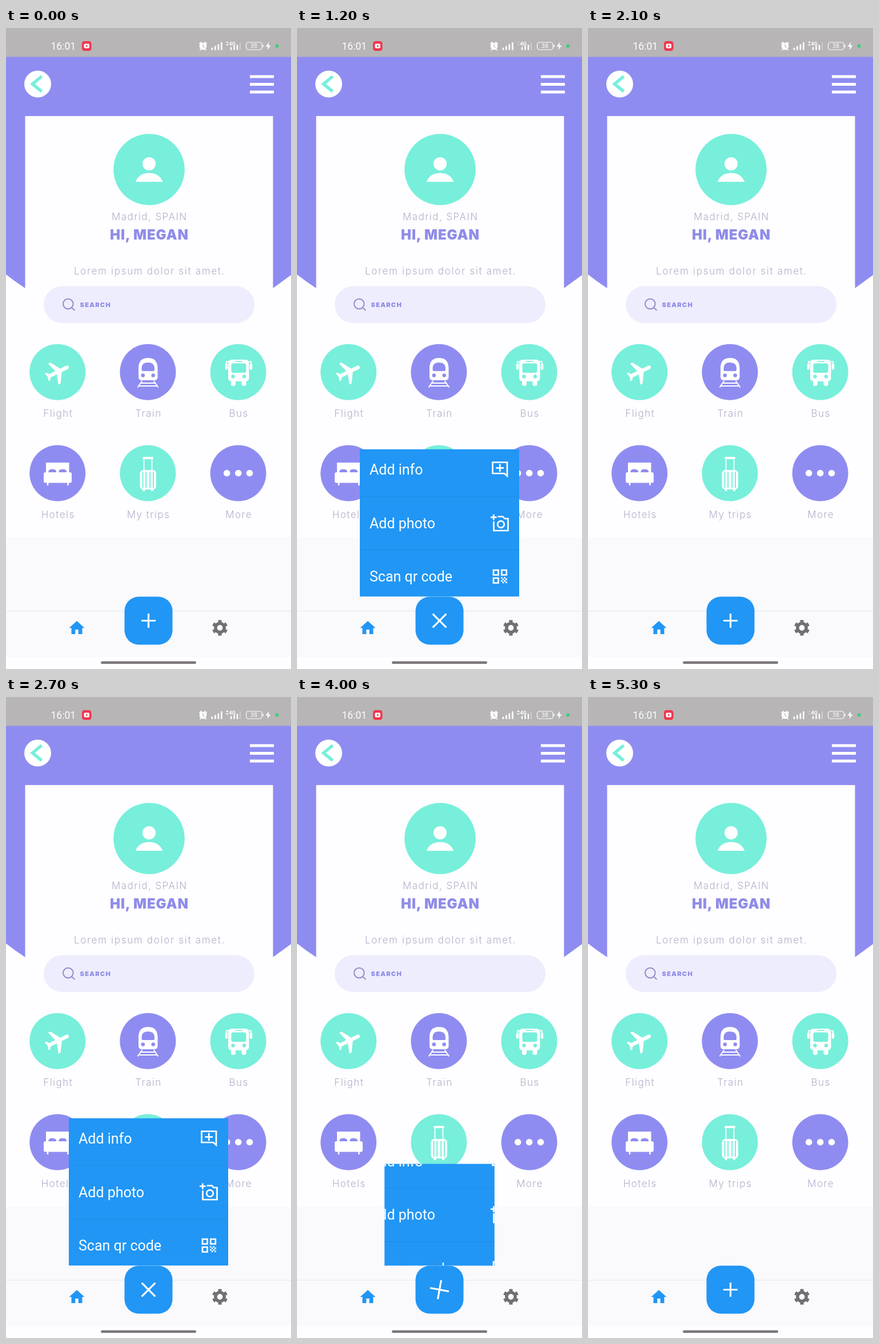
An HTML page for the animation above (5.4 s loop, 499 by 1121 pixels).

```html
<!DOCTYPE html>
<html lang="en">
<head>
<meta charset="utf-8">
<title>Travel home with pop-up menu</title>
<style>
  html, body { margin: 0; height: 100%; overflow: hidden; background: #fefdff; }
  svg { display: block; width: 100vw; height: 100vh; }
  .purple { fill: #8f8cf1; }
  .mint { fill: #77efdb; }
  .white { fill: #fff; }
  .blue { fill: #2196f5; }
  .line { fill: none; stroke: #fff; }
  .label { font: 300 17px Inter, sans-serif; letter-spacing: 1.45px; fill: #b3afca; text-anchor: middle; }
  .bold { font: 900 24px Inter, sans-serif; letter-spacing: .9px; fill: #8f8ce8; }
  .status { font-family: Roboto, sans-serif; fill: #fff; }
  #menu text { font: 25px Roboto, sans-serif; fill: #fff; }
</style>
</head>
<body>
<svg viewBox="0 0 499 1121">
  <defs><clipPath id="clip"><rect id="window"/></clipPath></defs>

  <!-- header -->
  <path class="purple" d="M0 50H499V432L467.5 455V154H33.500V455Q15 443 0 431Z"/>
  <rect width="499" height="50.500" fill="#b7b5b6"/>
  <circle class="white" cx="55.500" cy="98" r="23.500"/>
  <path d="M62.500 84.500L46.500 98L62.500 111" fill="none" stroke="#77efdb" stroke-width="5.500"/>
  <path class="line" stroke-width="4.800" d="M427 85H469M427 98.500H469M427 112H469"/>

  <!-- status bar -->
  <g class="status">
    <text x="78.500" y="38" font-size="17.500">16:01</text>
    <rect x="133" y="23" width="16.500" height="17" rx="4.500" fill="#f0364f"/>
    <rect class="white" x="136.500" y="27.500" width="9.500" height="8" rx="2"/>
    <path d="M140 29.500l3.500 2-3.500 2z" fill="#f0364f"/>
    <circle cx="345" cy="32" r="6.300"/>
    <path class="line" stroke-width="2" d="M338.500 28l4-3.500M351.500 28l-4-3.500M341 37l-1.500 2M349 37l1.500 2"/>
    <path d="M345 28.500V32.500L347.500 34" fill="none" stroke="#b7b5b6" stroke-width="1.300"/>
    <path class="line" stroke-width="2.700" d="M360.900 38.500v-4M366.400 38.500v-7M371.900 38.500v-10M377.400 38.500v-13.500"/>
    <path class="line" stroke-width="2.500" d="M394 38.500v-5M399.500 38.500v-7M405 38.500v-9"/>
    <path class="line" stroke-width="1.500" opacity=".45" d="M410 38.500v-13"/>
    <text x="390.500" y="30.500" font-size="9" font-weight="700">4G</text>
    <path id="arrows" d="M385 26l2.500-3 2.500 3zM385 28.500l2.500 3 2.500-3z"/>
    <rect class="line" x="420.600" y="25" width="27.500" height="13" rx="4" stroke-width="1.200"/>
    <path class="line" stroke-width="1.500" d="M450 29.500v4"/>
    <text x="428" y="35.300" font-size="10.500">38</text>
    <path d="M460.500 24.500l-6 8h4l-1 6 6-8h-4z"/>
    <circle cx="474.500" cy="31.500" r="3" fill="#3ccd7b"/>
  </g>

  <!-- profile -->
  <circle class="mint" cx="250.500" cy="247.500" r="62.300"/>
  <circle class="white" cx="250.500" cy="237.500" r="11.500"/>
  <path class="white" d="M226.500 269Q233 253.500 250.500 253.500T274.500 269Z"/>
  <text class="label" x="251.300" y="335.500">Madrid, SPAIN</text>
  <text class="bold" x="251" y="370" text-anchor="middle">HI, MEGAN</text>
  <text class="label" x="251.500" y="431" style="letter-spacing:1.7px">Lorem ipsum dolor sit amet.</text>
  <rect x="66" y="451.500" width="369" height="64.500" rx="32.200" fill="#eeedfd"/>
  <g fill="none" stroke="#918dcb" stroke-width="2"><circle cx="108.800" cy="482.500" r="8.800"/><path d="M115 489l5.500 5"/></g>
  <text class="bold" x="129.500" y="487.500" style="font-size:11px;letter-spacing:1.3px">SEARCH</text>

  <g id="tiles"></g>

  <!-- flight -->
  <path class="white" transform="translate(90.500 601.500) rotate(64) scale(2.150) translate(-11.500 -12)"
    d="M21 16v-2l-8-5V3.500C13 2.670 12.330 2 11.500 2S10 2.670 10 3.500V9l-8 5v2l8-2.500V19l-2 1.500V22l3.500-1 3.500 1v-1.500L13 19v-5.500z"/>
  <!-- train -->
  <path class="white" d="M232 595Q232 577 248.500 577T265.500 595V610Q265.500 616 259.500 616H238Q232 616 232 610Z"/>
  <path class="purple" d="M237.500 598V594Q238 585 248.500 585T260 594V598Q260 600 258 600H239.500Q237.500 600 237.500 598Z"/>
  <path class="line" stroke="#8f8cf1" stroke-width="1.800" d="M243 581.500H254"/>
  <circle class="purple" cx="239.800" cy="607.500" r="3.300"/><circle class="purple" cx="257.700" cy="607.500" r="3.300"/>
  <path class="line" stroke-width="2" d="M238.500 617L230.500 628.500M258.500 617L266.500 628.500M236 621H261M232 626H265"/>
  <!-- bus -->
  <rect class="white" x="389" y="580" width="36.500" height="38" rx="6"/>
  <rect class="mint" x="394.500" y="586.500" width="26" height="16.500" rx="3"/>
  <path class="mint" d="M401 582.300h13v1.600h-13z"/>
  <circle class="mint" cx="397.500" cy="609.500" r="3.200"/><circle class="mint" cx="417" cy="609.500" r="3.200"/>
  <path class="white" d="M394 616h8v7q0 3-4 3t-4-3zM412.500 616h8v7q0 3-4 3t-4-3z"/>
  <path class="line" stroke-width="1.800" d="M390 583.500H386V588M425 583.500H429V588"/>
  <path class="line" stroke-width="4.500" stroke-linecap="round" d="M386 589V595.500M429 589V595.500"/>
  <!-- hotel -->
  <path class="white" d="M70 760H110.500V778H70Z"/>
  <path class="purple" d="M74.500 778V775Q75 771.500 81 771.500T88 775V778ZM92.500 778V775Q93 771.500 99 771.500T106 775V778Z"/>
  <rect class="white" x="66" y="777" width="49" height="18.500" rx="3"/>
  <path class="line" stroke-width="2.500" d="M73 795v5M108.500 795v5"/>
  <!-- suitcase -->
  <path class="line" stroke-width="1.800" d="M241.500 753V774M255.500 753V774"/>
  <path class="line" stroke-width="4" stroke-linecap="round" d="M241 752H256"/>
  <rect class="white" x="234.500" y="773" width="28.500" height="34" rx="6"/>
  <path class="line" stroke="#77efdb" style="stroke:#77efdb" stroke-width="2" d="M239.500 776V804M245.200 776V804M252.200 776V804M258 776V804"/>
  <path class="line" stroke-width="4" d="M241.500 806v4M256 806v4"/>
  <!-- more -->
  <path class="line" stroke-width="11.600" stroke-linecap="round" d="M386.700 778.500h.01M406.700 778.500h.01M426.500 778.500h.01"/>

  <!-- bottom bar -->
  <rect y="891" width="499" height="209" fill="#faf9fc"/>
  <path d="M0 1020H499" stroke="#f0eff4" stroke-width="2"/>
  <path class="blue" transform="translate(107.800 1033) scale(1.350)" d="M10 20v-6h4v6h5v-8h3L12 3 2 12h3v8z"/>
  <g fill="none" stroke="#706f73" transform="translate(374.500 1049) rotate(90)">
    <circle r="7.700" stroke-width="5.600"/>
    <circle r="11.400" stroke-width="4.600" pathLength="12" stroke-dasharray="1 1" stroke-dashoffset=".5"/>
  </g>
  <rect x="166" y="1107.500" width="167" height="4.500" rx="2.200" fill="#7b777c"/>

  <!-- pop-up menu, laid out in its open position -->
  <g clip-path="url(#clip)">
    <g id="menu">
      <rect class="blue" x="110" y="736.500" width="279" height="258"/>
      <path d="M110 819H389M110 912.500H389" stroke="#1f8de6"/>
      <text x="127" y="781">Add info</text>
      <text x="127" y="874.500">Add photo</text>
      <text x="127" y="968">Scan qr code</text>
      <g class="line" stroke-width="2.700">
        <path d="M342.500 759.500H368V783.500L363 779H342.500ZM355.300 762.500V776M348.500 769.300H362"/>
        <path d="M344.500 863V879H369.500V858H363.500L360.500 854.500H351.500M344.300 850.500V861M339 855.700H349.500"/>
        <circle cx="357" cy="868" r="5.800"/>
        <path d="M344 948h8.500v8.500h-8.500zM358.300 948h8.500v8.500h-8.500zM344 962h8.500v8.500h-8.500z"/>
        <path stroke-dasharray="2.700" d="M357 961.500H368M359.700 964.200H368M357 966.900H368M359.700 969.600H368"/>
      </g>
    </g>
  </g>
  <rect class="blue" x="207.500" y="994.500" width="84" height="84" rx="25"/>
  <path id="cross" class="line" stroke-width="3.200"/>
</svg>
<script>
const $ = id => document.getElementById(id);
const LOOP = 5400, DURATION = 300;
const toggles = [322, 1400, 2250, 3250, 3904, 4600]; // open, close, open, ...

$('tiles').innerHTML = ['Flight', 'Train', 'Bus', 'Hotels', 'My trips', 'More'].map((name, i) => {
  const x = 90.2 + i % 3 * 158.2, y = i < 3 ? 601.7 : 778.5;
  return `<circle class="${i % 2 ? 'purple' : 'mint'}" cx="${x}" cy="${y}" r="49"/>
    <text class="label" x="${x + 1}" y="${y + 78}">${name}</text>`;
}).join('');

function setAttrs(el, attrs) {
  for (const key in attrs) el.setAttribute(key, attrs[key]);
}

function openness(t) {
  const last = toggles.filter(start => start <= t).length - 1;
  if (last < 0) return 0;
  const u = Math.min(1, (t - toggles[last]) / DURATION);
  return last % 2 ? 1 - u : u;
}

function draw(now) {
  const t = now % LOOP;
  const size = 1 - (1 - openness(t)) ** 3;
  const width = 279 * size, height = 258 * size;
  setAttrs($('window'), { x: 249.5 - width / 2, y: 994.5 - height, width, height });
  setAttrs($('menu'), { transform: `translate(0 ${(258 - height) / 2})` });

  const arm = size > 0 ? 16.7 : 12.5;
  setAttrs($('cross'), {
    d: `M${-arm} 0H${arm}M0 ${-arm}V${arm}`,
    transform: `translate(249.5 1036.5) rotate(${45 * size ** 4})`
  });
  setAttrs($('arrows'), { opacity: t < 200 || t > 1500 && t < 5000 ? 1 : .25 });
  requestAnimationFrame(draw);
}
requestAnimationFrame(draw);
</script>
</body>
</html>
```
